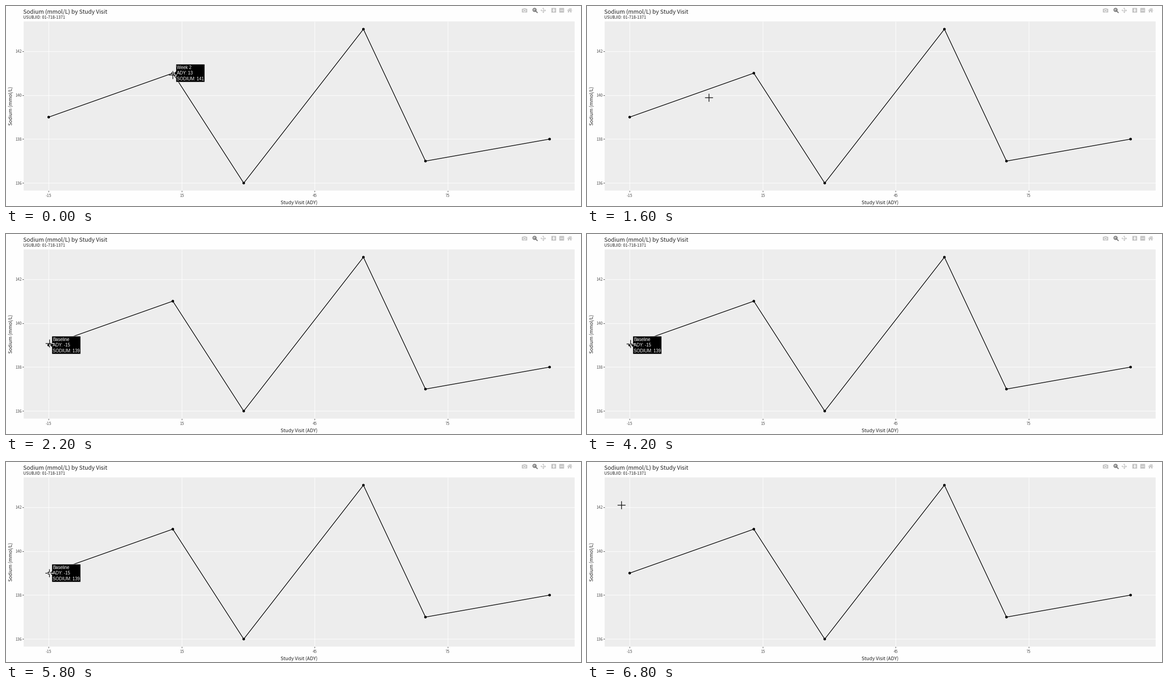
These frames come from a looping animation (1269x441 px, 8000 ms). A matplotlib script:

```python
import numpy as np
import matplotlib.pyplot as plt
from matplotlib.animation import FuncAnimation
from matplotlib.patches import Circle, FancyBboxPatch, Polygon, Rectangle

W, H, DPI = 1269, 441, 72          # at 72 dpi one point is one pixel
STEP, LOOP = 200, 8000
SANS, LABEL = "Noto Sans CJK JP", "Liberation Sans"
PAPER, PANEL, INK = "#fefefe", "#ededed", "#222222"
ICON, ICON_ON = "#c6c6c6", "#7a7a7a"

VISITS = [(-15, 139), (13, 141), (29, 136), (56, 143), (70, 137), (98, 138)]

# (start ms, cursor x, cursor y, hovered visit)
POSES = [
    (0, 368.3, 152.3, 1),
    (1400, 362.3, 156.3, 1),
    (1600, 269.3, 202.3, None),
    (1800, 162.3, 219.3, None),
    (2000, 98.3, 241.3, None),
    (2200, 96.3, 241.5, 0),
    (4200, 96.3, 242.5, 0),
    (4400, 96.0, 244.0, 0),
    (5800, 95.8, 245.3, 0),
    (6000, 112.3, 252.3, None),
    (6200, 115.3, 177.3, None),
    (6400, 83.3, 140.3, None),
    (6600, 81.3, 122.3, None),
    (6800, 76.3, 95.3, None),
]
HOVER_TEXT = {
    0: ("Baseline", "ADY: -15", "SODIUM: 139"),
    1: ("Week 2", "ADY: 13", "SODIUM: 141"),
}


def px(day):
    return 94.2 + (day + 15) * 9.783


def py(value):
    return 99.6 + (142 - value) * 48.47


fig = plt.figure(figsize=(W / DPI, H / DPI), dpi=DPI, facecolor=PAPER)
ax = fig.add_axes([0, 0, 1, 1])
ax.set(xlim=(0, W), ylim=(H, 0))
ax.axis("off")


def line(xs, ys, color, width, z=2, **kw):
    return ax.plot(xs, ys, color=color, lw=width, zorder=z, **kw)[0]


def text(x, y, s, size, color=INK, ha="left", font=SANS, z=3, **kw):
    return ax.text(x, y, s, fontsize=size, color=color, ha=ha, va="baseline",
                   family=font, zorder=z, **kw)


def box(x, y, w, h, color, z=3):
    return ax.add_patch(Rectangle((x, y), w, h, fc=color, lw=0, zorder=z))


def shape(points, color, z=3):
    return ax.add_patch(Polygon(points, fc=color, lw=0, zorder=z))


def rounded(x, y, w, h, r, color):
    ax.add_patch(FancyBboxPatch((x, y), w, h, fc=color, lw=0, zorder=3,
                                boxstyle=f"round,pad=0,rounding_size={r}"))


def draw_chart():
    box(39, 34, 1216, 373, PANEL, 1)
    for day in (-15, 15, 45, 75):
        x = px(day)
        line([x, x], [34, 407], "white", 1.1, solid_capstyle="butt")
        line([x, x], [407, 410], "#333333", 1, solid_capstyle="butt")
        text(x, 421, str(day), 8.7, "#555555", "center")
    for value in (136, 138, 140, 142):
        y = py(value)
        line([39, 1255], [y, y], "white", 1.1, solid_capstyle="butt")
        line([35.5, 39], [y, y], "#333333", 1, solid_capstyle="butt")
        text(34.3, y + 3.2, str(value), 8.7, "#555555", "right")

    xs, ys = zip(*((px(d), py(v)) for d, v in VISITS))
    line(xs, ys, "black", 1.45, 4)
    for x, y in zip(xs, ys):
        ax.add_patch(Circle((x, y), 2.9, fc="black", lw=0, zorder=5))

    text(38.5, 17, "Sodium (mmol/L) by Study Visit", 12.65)
    text(38.5, 27.8, "USUBJID: 01-718-1371", 8.85)
    text(647, 436.5, "Study Visit (ADY)", 10.65, ha="center")
    text(14.6, 220.3, "Sodium (mmol/L)", 10.5, ha="center", rotation=90,
         rotation_mode="anchor")


def draw_toolbar():
    # camera
    rounded(1138.4, 6, 12, 8.4, 1.2, ICON)
    box(1141.8, 4.8, 5.2, 2, ICON)
    ax.add_patch(Circle((1144.4, 10.1), 2.6, fc=ICON, ec=PAPER, lw=1.1, zorder=4))
    # magnifier
    ax.add_patch(Circle((1166.5, 8.6), 3.6, fc="#d4d4d4", ec=ICON_ON, lw=1.9, zorder=3))
    line([1169.3, 1172.4], [11.5, 14.4], ICON_ON, 2.2, 3)
    line([1164.9, 1168.1], [8.6, 8.6], ICON_ON, 1, 4)
    line([1166.5, 1166.5], [7, 10.2], ICON_ON, 1, 4)
    # pan arrows
    cx, cy = 1185.5, 9.5
    line([cx - 4, cx + 4], [cy, cy], ICON, 1.4, 3)
    line([cx, cx], [cy - 4, cy + 4], ICON, 1.4, 3)
    for dx, dy in ((1, 0), (-1, 0), (0, 1), (0, -1)):
        tip = np.array([cx + 5.9 * dx, cy + 5.9 * dy])
        back, side = 2.6 * np.array([dx, dy]), 2.3 * np.array([dy, dx])
        shape([tip, tip - back + side, tip - back - side], ICON)
    # zoom in and out
    for x in (1208.8, 1226.4):
        rounded(x - 5.3, 4.3, 10.6, 10.4, 1, ICON)
        box(x - 3.2, 8.7, 6.4, 1.6, PAPER, 4)
    box(1208, 6.3, 1.6, 6.4, PAPER, 4)
    # home
    shape([(1238.2, 9.9), (1244, 4.5), (1249.8, 9.9), (1249, 10.7),
           (1244, 6.2), (1239, 10.7)], ICON)
    shape([(1240, 10.5), (1244, 6.9), (1248, 10.5), (1248, 14.3), (1245.2, 14.3),
           (1245.2, 11.3), (1242.8, 11.3), (1242.8, 14.3), (1240, 14.3)], ICON)
    box(1246.3, 5, 1.5, 3, ICON)


def make_tooltip(visit):
    x, y = (f(v) for f, v in zip((px, py), VISITS[visit]))
    left, right, half, arrow = x + 7, x + 70.6, 19.8, 4.4
    bubble = Polygon([(x + 2.8, y), (left, y - arrow), (left, y - half),
                      (right, y - half), (right, y + half), (left, y + half),
                      (left, y + arrow)],
                     fc="black", ec="white", lw=0.7, zorder=6)
    ax.add_patch(bubble)
    rows = [text(x + 8.8, y + 3.2 + 12.4 * (i - 1), s, 9.6, "white", font=LABEL, z=7)
            for i, s in enumerate(HOVER_TEXT[visit])]
    return [bubble, *rows]


def make_cross(color, z, clip=None):
    cross = [line([], [], color, 1.5, z, solid_capstyle="butt", snap=False)
             for _ in range(2)]
    if clip is not None:
        for arm in cross:
            arm.set_clip_path(clip)
    return cross


draw_chart()
draw_toolbar()
tooltips = {v: make_tooltip(v) for v in HOVER_TEXT}
cursor = make_cross("#131313", 8)

# the cursor inverts to white over a hovered marker and its label
inverted = {}
for v, parts in tooltips.items():
    marker = ax.add_patch(Circle((px(VISITS[v][0]), py(VISITS[v][1])), 2.9,
                                 fc="none", lw=0))
    inverted[v] = make_cross("white", 9, parts[0]) + make_cross("white", 9, marker)


def update(frame):
    _, x, y, hovered = [p for p in POSES if p[0] <= frame * STEP][-1]
    for v, parts in tooltips.items():
        for part in parts + inverted[v]:
            part.set_visible(v == hovered)
    arms = cursor + [arm for group in inverted.values() for arm in group]
    for across, upright in zip(arms[::2], arms[1::2]):
        across.set_data([x - 8.8, x + 8.8], [y, y])
        upright.set_data([x, x], [y - 8.8, y + 8.8])
    return []


anim = FuncAnimation(fig, update, frames=LOOP // STEP, interval=STEP,
                     repeat=True, repeat_delay=0, blit=False)
plt.show()
```
